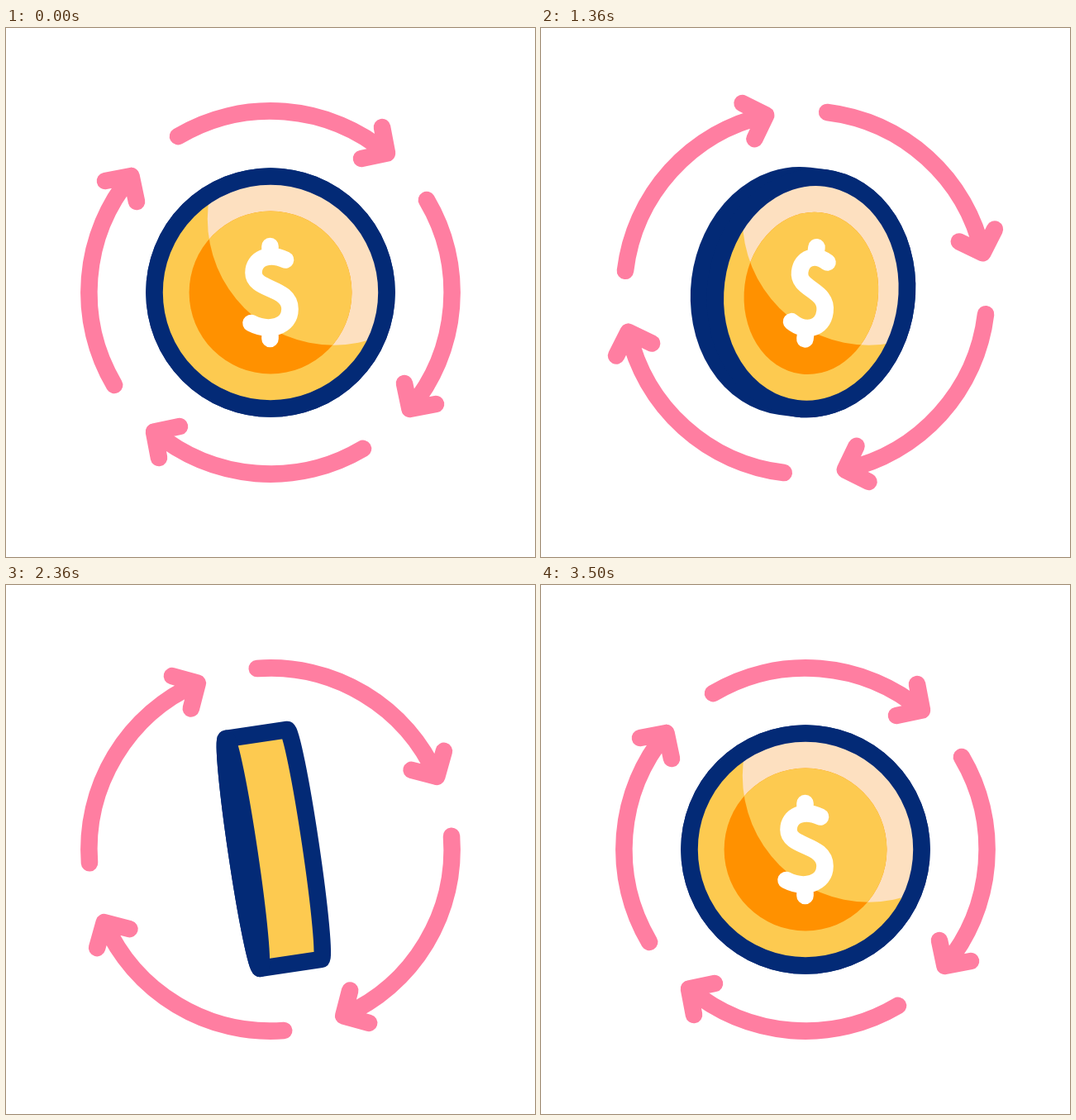
An HTML page with a canvas that plays this animation: 640x640 px, repeating every 3600 ms.

```html
<!DOCTYPE html>
<html lang="en">
<head>
<meta charset="utf-8">
<title>Spinning coin</title>
<style>
  html, body { margin: 0; width: 100%; height: 100%; overflow: hidden; background: #fff; }
  canvas { display: block; width: 640px; height: 640px; }
</style>
</head>
<body>
<canvas id="stage" width="640" height="640"></canvas>
<script>
const ctx = document.getElementById('stage').getContext('2d');
const LOOP = 3600, RAD = Math.PI / 180, QUARTER = Math.PI / 2;
const PINK = '#ff7ea1', NAVY = '#032a76', YELLOW = '#fdca50', ORANGE = '#ff9100', PEACH = '#fde0c0';
const RIM = 140.5, DISC = 98.4, THICKNESS = 75;

// Keyframes: [time in ms, degrees], eased in and out
const ORBIT = [[0, 0], [600, -35], [2400, 387], [3500, 360]];
const SPIN = [[0, 0], [345, 0], [2460, 456], [3500, 360]];
const TILT = [[0, 0], [900, 10.6], [2720, -10.6], [3500, 0]];

const DOLLAR = new Path2D('M18-39.5C-2-49-20.5-41-20.5-24C-20.5-2 23.5-7 23.5 20' +
  'C23.5 42-2 48-23.5 37M-.5-56V-45M-.5 44V56');

function valueAt(keys, t) {
  const next = keys.findIndex(key => key[0] > t);
  if (next < 0) return keys[keys.length - 1][1];
  const [t0, a] = keys[next - 1], [t1, b] = keys[next];
  const s = (t - t0) / (t1 - t0);
  return a + (b - a) * s * s * (3 - 2 * s);
}

function fill(path, color) {
  ctx.fillStyle = color;
  ctx.fill(path);
}

function stroke(path, color) {
  ctx.strokeStyle = color;
  ctx.stroke(path);
}

function ellipse(x, rx, ry) {
  const path = new Path2D();
  path.ellipse(x, 0, rx, ry, 0, 0, Math.PI * 2);
  return path;
}

function drawArrows(angle) {
  const arrow = new Path2D();
  arrow.arc(0, 0, 219.6, -120.65 * RAD, -50.1 * RAD);
  arrow.moveTo(135, -200);
  arrow.lineTo(141, -168.5);
  arrow.lineTo(110, -162);
  ctx.save();
  ctx.rotate(angle);
  for (let i = 0; i < 4; i++) {
    stroke(arrow, PINK);
    ctx.rotate(QUARTER);
  }
  ctx.restore();
}

function drawCoin(spin, tilt) {
  const squash = Math.max(Math.abs(Math.cos(spin)), 0.001);
  const side = Math.sin(spin) * Math.cos(spin) < 0 ? -1 : 1;
  const depth = THICKNESS * Math.abs(Math.sin(spin)) ** 2.35;
  const front = side * depth * (0.455 - 0.13 * squash);
  const back = front - side * depth;
  const rx = RIM * squash;

  // The highlight stays still while the coin turns beneath it
  const shine = new Path2D(), circle = new Path2D();
  circle.arc(76.5, -89, 152.7, 0, Math.PI * 2);
  shine.addPath(circle, new DOMMatrix().rotate(-tilt / RAD));

  const body = new Path2D();
  body.ellipse(Math.min(front, back), 0, rx, RIM, 0, QUARTER, 3 * QUARTER);
  body.ellipse(Math.max(front, back), 0, rx, RIM, 0, -QUARTER, QUARTER);
  body.closePath();
  const face = ellipse(front, rx, RIM);
  const disc = ellipse(front, DISC * squash, DISC);
  const sign = new Path2D();
  sign.addPath(DOLLAR, new DOMMatrix([squash, 0, 0, 1, front, 0]));

  ctx.save();
  ctx.rotate(tilt);
  fill(body, YELLOW);
  stroke(body, NAVY);

  ctx.save();
  ctx.clip(face);
  fill(face, YELLOW);
  fill(shine, PEACH);
  fill(disc, ORANGE);
  ctx.clip(disc);
  fill(shine, YELLOW);
  ctx.restore();

  ctx.save();
  ctx.clip(face);
  stroke(sign, '#fff');
  ctx.restore();
  stroke(face, NAVY);
  ctx.restore();
}

function draw(now) {
  const t = now % LOOP;
  ctx.setTransform(1, 0, 0, 1, 0, 0);
  ctx.fillStyle = '#fff';
  ctx.fillRect(0, 0, 640, 640);
  ctx.translate(320, 320);
  ctx.lineWidth = 20.6;
  ctx.lineCap = ctx.lineJoin = 'round';
  drawArrows(valueAt(ORBIT, t) * RAD);
  drawCoin(valueAt(SPIN, t) * RAD, valueAt(TILT, t) * RAD);
}

const start = performance.now();
function tick() {
  draw(performance.now() - start);
  requestAnimationFrame(tick);
}
tick();
</script>
</body>
</html>
```
